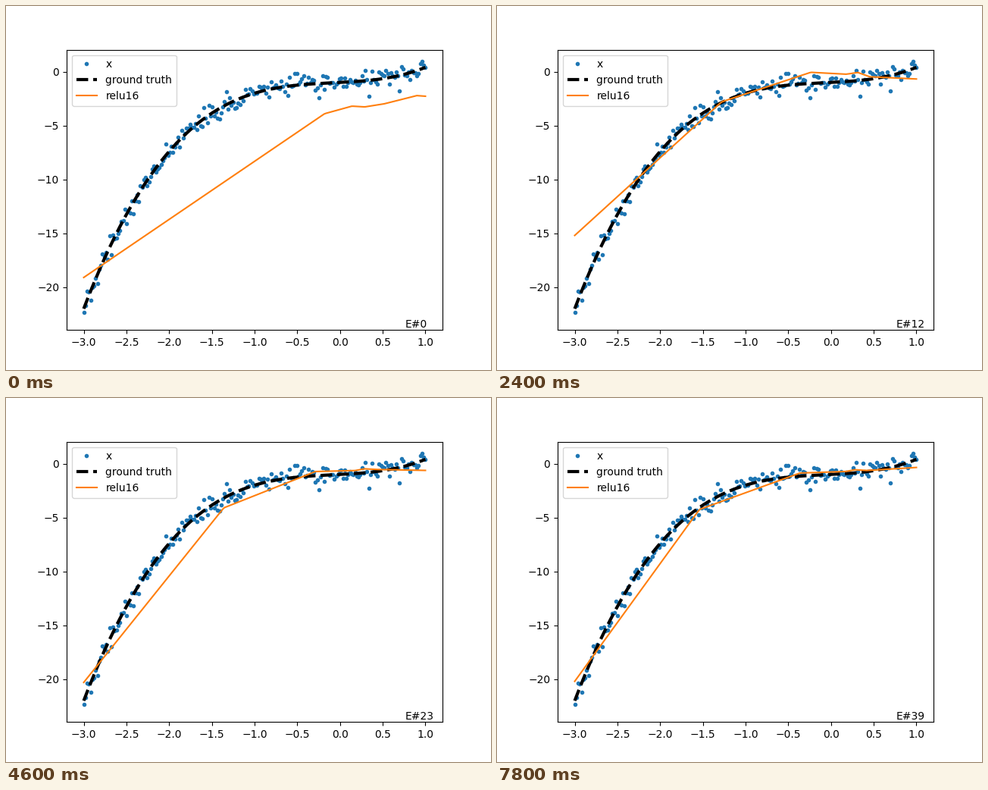
These frames come from a looping animation (640 by 480 pixels, 8 s). A matplotlib script:

```python
import numpy as np
import matplotlib.pyplot as plt
from matplotlib.animation import FuncAnimation

EPOCHS = 40
STEP_MS = 200
SAMPLES = 200
NOISE = 0.5

# Untrained network: corners of its first output
START_X = [-3, -0.18, 0.14, 0.29, 0.52, 0.9, 1]
START_Y = [-19.1, -3.9, -3.2, -3.27, -2.98, -2.22, -2.28]

# Main corners of the trained output at a few epochs
KEYS = [6, 12, 17, 23, 29, 39]
LEFT_Y = [-16.25, -15.2, -17.9, -20.3, -18.4, -20.2]
BEND_X = [-0.81, -1.28, -1.31, -1.36, -1.5, -1.54]
BEND_Y = [-1.9, -2.8, -3.5, -4.1, -3.9, -4.25]
SHELF_Y = [-0.2, -0.06, -0.42, -0.73, -0.56, -0.87]


def truth(x):
    return 0.8 * x**3 + 0.2 * x**2 + 0.4 * x - 1


def trained(x, epoch):
    left, bend_x, bend_y, shelf = (
        np.interp(epoch, KEYS, track)
        for track in (LEFT_Y, BEND_X, BEND_Y, SHELF_Y))
    dip = 0.6 * shelf - 0.2
    bump_x = 0.28 + 0.25 * np.exp(-epoch / 6)
    corners = [
        (-3, left),
        (bend_x, bend_y),
        (-0.18 - 0.0047 * epoch, shelf),
        (0.18, dip),
        (bump_x, dip + 0.16),
        (bump_x + 0.14, -0.4 - 0.006 * epoch),
        (1, -0.68 + 0.00045 * (epoch - 12)**2),
    ]
    return np.interp(x, *zip(*corners))


def fit(x, epoch):
    # The initial error dies away over the first few epochs
    error = np.interp(x, START_X, START_Y) - trained(x, 0)
    return trained(x, epoch) + error * 0.4**epoch


rng = np.random.default_rng(4)
x = np.linspace(-3, 1, SAMPLES)
noisy = truth(x) + rng.normal(0, NOISE, SAMPLES)

fig, ax = plt.subplots(figsize=(6.4, 4.8), dpi=100)
ax.plot(x, noisy, ".", color="C0", label="x")
ax.plot(x, truth(x), "--", color="black", linewidth=3, label="ground truth")
line, = ax.plot(x, fit(x, 0), color="C1", label="relu16")
label = ax.text(0.9, 0.01, "E#0", transform=ax.transAxes)
ax.set_xlim(-3.2, 1.2)
ax.set_ylim(-23.97, 2.04)
ax.legend(loc="upper left")


def update(epoch):
    line.set_ydata(fit(x, epoch))
    label.set_text(f"E#{epoch}")
    return line, label


anim = FuncAnimation(fig, update, frames=EPOCHS, interval=STEP_MS,
                     repeat=True, repeat_delay=0)
plt.show()
```
